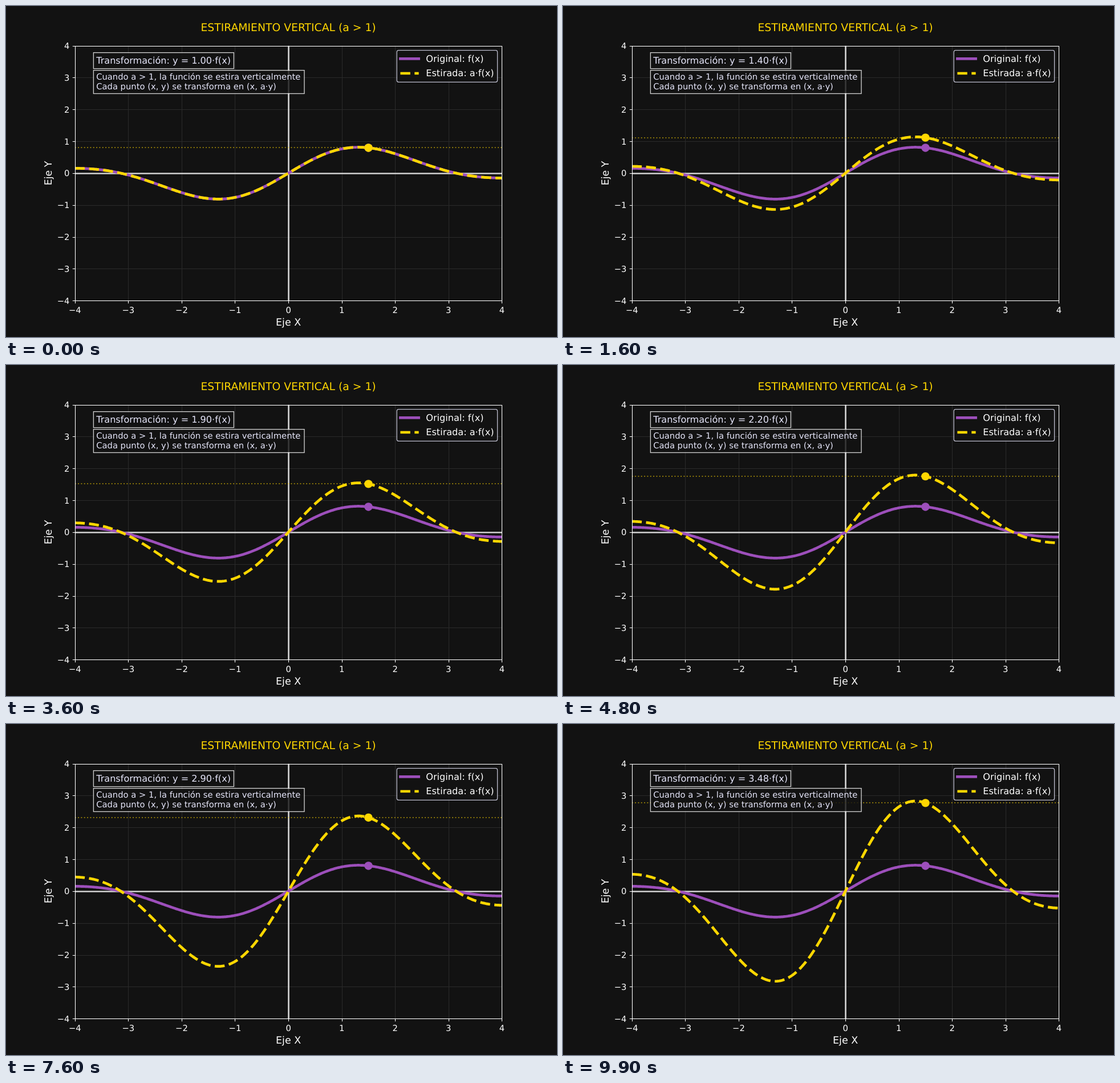
An HTML page that plays this animation: 966x580 px, repeating every 10 s.

```html
<!DOCTYPE html>
<html lang="es">
<head>
<meta charset="utf-8">
<title>Estiramiento vertical</title>
<style>
  html, body { margin: 0; width: 100%; height: 100%; overflow: hidden; background: #121212; }
  svg { display: block; width: 966px; height: 580px; }
  text { font-family: "DejaVu Sans", Verdana, sans-serif; fill: #fff; white-space: pre; text-rendering: geometricPrecision; }
</style>
</head>
<body>
<svg id="stage" viewBox="0 0 966 580" xmlns="http://www.w3.org/2000/svg"></svg>
<script>
const svg = document.getElementById('stage');
const BG = '#121212', GOLD = '#ffd700', PURPLE = '#9d4fbb', LAVENDER = '#e6e6fa';
const PT = 96.6 / 72;
const LEFT = 120.75, RIGHT = 869.4, TOP = 69.6, BOTTOM = 516.2;
const STEPS = 100, STEP_MS = 100, POINT_X = 1.5;
const CURVE_WIDTH = 3.5 * PT;
const DASH = `${3.7 * CURVE_WIDTH} ${1.6 * CURVE_WIDTH}`;

const px = x => LEFT + (x + 4) / 8 * (RIGHT - LEFT);
const py = y => BOTTOM - (y + 4) / 8 * (BOTTOM - TOP);
const snap = v => Math.floor(v + 0.5) + 0.5;
const f = x => Math.sin(x) * Math.exp(-0.1 * x * x);

function add(tag, attrs, parent = svg) {
  const el = document.createElementNS(svg.namespaceURI, tag);
  for (const key in attrs) el.setAttribute(key, attrs[key]);
  return parent.appendChild(el);
}
const line = (x1, y1, x2, y2, stroke, width, more = {}, parent = svg) =>
  add('line', { x1, y1, x2, y2, stroke, 'stroke-width': width, ...more }, parent);
function label(str, x, y, points, more = {}) {
  const el = add('text', { x, y, 'font-size': points * PT, ...more });
  el.textContent = str;
  return el;
}
const box = (x, y, width, height, more = {}) =>
  add('rect', { x, y, width, height, fill: BG, stroke: '#fff', 'stroke-width': PT, opacity: 0.8, ...more });

function curvePath(scale) {
  let d = '';
  for (let i = 0; i <= 400; i++) {
    const x = -4 + i / 50;
    d += `${i ? 'L' : 'M'}${px(x).toFixed(2)} ${py(scale * f(x)).toFixed(2)}`;
  }
  return d;
}

// Plot area
const clip = add('clipPath', { id: 'plot' });
add('rect', { x: LEFT, y: TOP, width: RIGHT - LEFT, height: BOTTOM - TOP }, clip);
const plot = add('g', { 'clip-path': 'url(#plot)' });

const x0 = snap(LEFT), x1 = snap(RIGHT), y0 = snap(TOP), y1 = snap(BOTTOM);
for (let k = -4; k <= 4; k++) {
  const gx = snap(px(k)), gy = snap(py(k));
  line(gx, TOP, gx, BOTTOM, '#2a2a2a', 1.07, {}, plot);
  line(LEFT, gy, RIGHT, gy, '#2a2a2a', 1.07, {}, plot);
}
const axis = { 'stroke-opacity': 0.8 };
line(LEFT, snap(py(0)), RIGHT, snap(py(0)), '#fff', 2 * PT, axis, plot);
line(snap(px(0)), TOP, snap(px(0)), BOTTOM, '#fff', 2 * PT, axis, plot);

const curve = { fill: 'none', 'stroke-width': CURVE_WIDTH, 'stroke-linejoin': 'round' };
add('path', { ...curve, d: curvePath(1), stroke: PURPLE }, plot);
const stretched = add('path', { ...curve, stroke: GOLD, 'stroke-dasharray': DASH }, plot);
const level = line(LEFT, 0, RIGHT, 0, GOLD, 1.5 * PT,
  { 'stroke-opacity': 0.5, 'stroke-dasharray': `${1.5 * PT} ${2.475 * PT}` }, plot);
const dot = fill => add('circle', { cx: px(POINT_X), cy: py(f(POINT_X)), r: 7.2, fill }, plot);
dot(PURPLE);
const movingDot = dot(GOLD);

// Frame, ticks and labels
add('rect', { x: x0, y: y0, width: x1 - x0, height: y1 - y0, fill: 'none', stroke: '#fff', 'stroke-width': 1.07 });
for (let k = -4; k <= 4; k++) {
  const tx = snap(px(k)), ty = snap(py(k));
  const num = k < 0 ? '\u2212' + -k : String(k);
  line(tx, y1, tx, y1 + 4.7, '#fff', 1.07);
  line(x0 - 4.7, ty, x0, ty, '#fff', 1.07);
  label(num, px(k), 537.5, 11, { 'text-anchor': 'middle' });
  label(num, 111.4, py(k) + 5.5, 11, { 'text-anchor': 'end' });
}
const centered = { 'text-anchor': 'middle' };
label('Eje X', px(0), 559.5, 13, centered);
label('Eje Y', 0, 0, 13, { ...centered, transform: `translate(79.7 ${py(0)}) rotate(-90)` });
label('ESTIRAMIENTO VERTICAL (a > 1)', px(0), 43.7, 14, { ...centered, style: `fill:${GOLD}` });

// Notes
const note = { style: `fill:${LAVENDER}` };
box(153.4, 81.7, 246, 28);
const formula = label('', 158.2, 100.8, 12, note);
box(153.4, 112.7, 369.6, 40.8);
label('Cuando a > 1, la función se estira verticalmente', 158.2, 128.7, 11, note);
label('Cada punto (x, y) se transforma en (x, a·y)', 158.2, 145.8, 11, note);

// Legend
box(685.2, 77.7, 176.4, 55.6, { rx: 3.2, stroke: LAVENDER });
line(691.4, 92.4, 723.6, 92.4, PURPLE, CURVE_WIDTH, { 'stroke-linecap': 'square' });
line(691.4, 118, 723.6, 118, GOLD, CURVE_WIDTH, { 'stroke-dasharray': DASH });
label('Original: f(x)', 736.3, 98, 12);
label('Estirada: a·f(x)', 736.3, 123.2, 12);

let shown = -1;
function render(ms) {
  const step = Math.floor(ms / STEP_MS) % STEPS;
  if (step === shown) return;
  shown = step;
  const a = 1 + 2.5 * step / STEPS;
  const y = py(a * f(POINT_X));
  stretched.setAttribute('d', curvePath(a));
  movingDot.setAttribute('cy', y);
  level.setAttribute('y1', Math.round(y));
  level.setAttribute('y2', Math.round(y));
  formula.textContent = `Transformación: y = ${a.toFixed(2)}·f(x)`;
}

const start = performance.now();
function tick() {
  render(performance.now() - start);
  requestAnimationFrame(tick);
}
tick();
</script>
</body>
</html>
```
